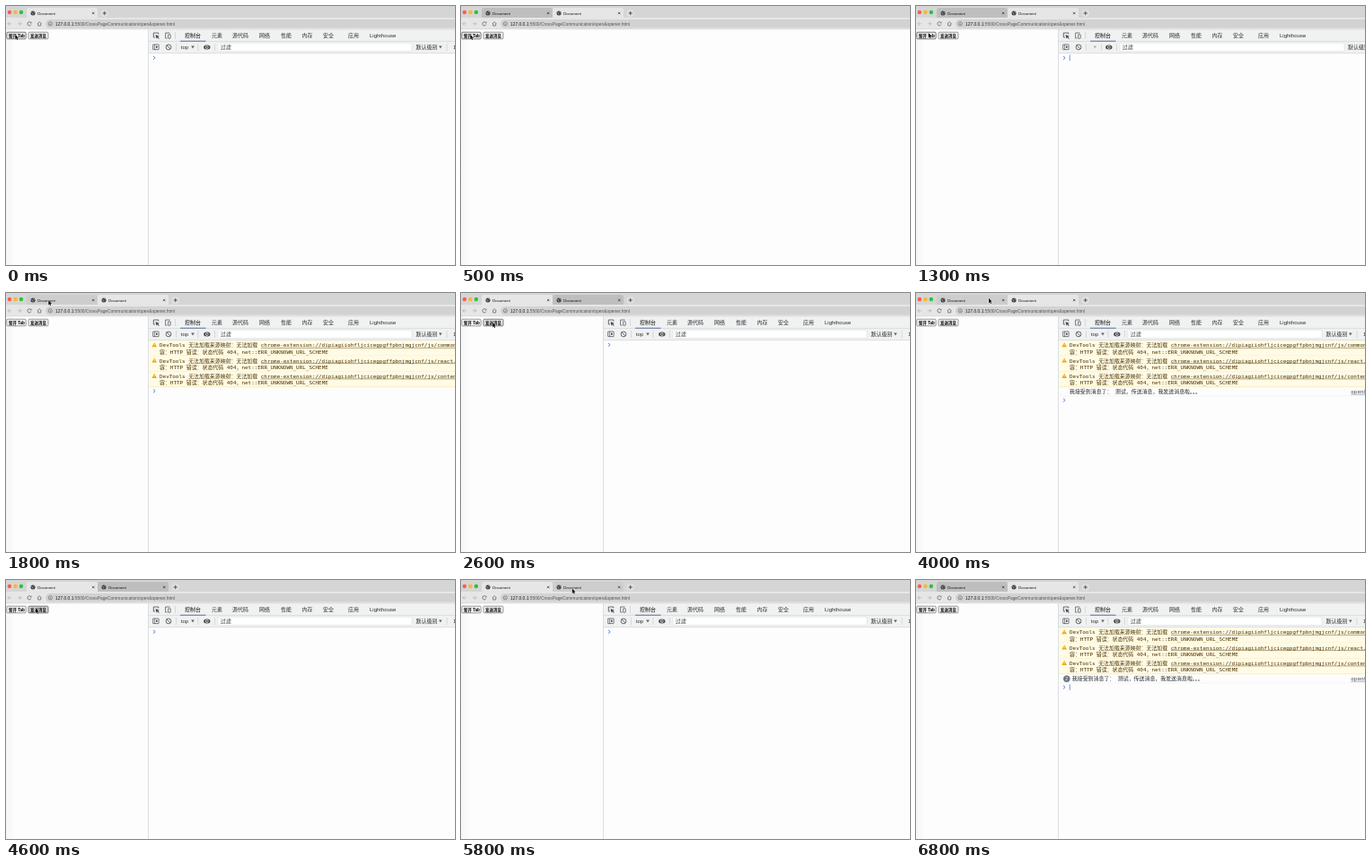
An HTML page with a canvas for the animation above (7 s loop, 500 px wide and 289 px high).

```html
<!DOCTYPE html>
<html lang="zh-CN">
<head>
<meta charset="utf-8">
<title>Document</title>
<style>
html, body { margin: 0; width: 100%; height: 100%; overflow: hidden; background: #fdfdfd; }
canvas { display: block; width: 500px; height: 289px; }
</style>
</head>
<body>
<canvas id="stage"></canvas>
<script>
const W = 500, H = 289, LOOP = 7000, STEP = 100;
const SANS = '"Liberation Sans", "Noto Sans CJK SC", "Noto Sans CJK", sans-serif';
const MONO = '"DejaVu Sans Mono", "Noto Sans CJK SC", "Noto Sans CJK", monospace';
const canvas = document.getElementById('stage');
const ctx = canvas.getContext('2d');
const dpr = window.devicePixelRatio || 1;
canvas.width = W * dpr;
canvas.height = H * dpr;

// Pointer moves: start, end, from point, to point
const moves = [
  [1000, 1300, [10.3, 31.8], [13.8, 30]],
  [1300, 1800, [13.8, 30], [47.3, 8]],
  [1900, 2600, [47.3, 8], [35.2, 32.8]],
  [2700, 3400, [35.2, 32.8], [121, 10]],
  [3500, 4000, [121, 10], [81, 5.8]],
  [4200, 4600, [81, 5.8], [33, 31.5]],
  [5100, 5800, [33, 31.5], [123.8, 9.5]],
  [5900, 6300, [123.8, 9.5], [134, -10]]
];
const extensionFiles = ['common.js', 'react.js', 'content.js'];

const within = (t, a, b) => t >= a && t < b;

function pointerAt(t) {
  let point = moves[0][2];
  for (const [start, end, from, to] of moves) {
    if (t < start) break;
    const p = Math.min(1, (t - start) / (end - start));
    const eased = p * p * (3 - 2 * p);
    point = from.map((v, i) => v + (to[i] - v) * eased);
  }
  return point;
}

function rect(x, y, w, h, fill, radius = 0, stroke) {
  ctx.beginPath();
  ctx.roundRect(x, y, w, h, radius);
  if (fill) { ctx.fillStyle = fill; ctx.fill(); }
  if (stroke) { ctx.strokeStyle = stroke; ctx.lineWidth = 0.7; ctx.stroke(); }
}

function line(points, color, width = 0.8) {
  ctx.beginPath();
  points.forEach(([x, y]) => ctx.lineTo(x, y));
  ctx.strokeStyle = color;
  ctx.lineWidth = width;
  ctx.stroke();
}

function polygon(points, fill) {
  ctx.beginPath();
  points.forEach(([x, y]) => ctx.lineTo(x, y));
  ctx.closePath();
  ctx.fillStyle = fill;
  ctx.fill();
}

function arc(x, y, r, { fill, stroke, width = 0.8, from = 0, to = Math.PI * 2 }) {
  ctx.beginPath();
  ctx.arc(x, y, r, from, to);
  if (fill) { ctx.fillStyle = fill; ctx.fill(); }
  if (stroke) { ctx.strokeStyle = stroke; ctx.lineWidth = width; ctx.stroke(); }
}

// Set large and scaled down so that small sizes keep fractional advances.
function text(str, x, y, size, color, family = SANS, weight = 400) {
  ctx.save();
  ctx.translate(x, y);
  ctx.scale(0.1, 0.1);
  ctx.font = `${weight} ${size * 10}px ${family}`;
  ctx.fillStyle = color;
  ctx.fillText(str, 0, 0);
  const width = ctx.measureText(str).width / 10;
  ctx.restore();
  return width;
}

const downArrow = (x, y, color) =>
  polygon([[x - 1.8, y - 1.5], [x + 1.8, y - 1.5], [x, y + 1.6]], color);
const separator = (x, y) => line([[x, y - 4], [x, y + 4]], '#cbcdd1', 0.7);

function drawTab(x, active, hovered) {
  if (active || hovered) {
    rect(x, 2, 79, 12, active ? '#e7e6e6' : '#cecdcd', [3, 3, 0, 0]);
  } else {
    rect(x, 2, 79, 11, '#bfbebe', [3, 3, 0, 0]);
  }
  arc(x + 7, 8, 2.5, { fill: '#35383b' });
  line([[x + 5.2, 7.2], [x + 6.8, 8], [x + 7, 9.7]], '#c9c9c9', 0.7);
  line([[x + 7.2, 6], [x + 8.8, 7.5]], '#c9c9c9', 0.7);
  text('Document', x + 12.2, 9.8, 4.3, '#0c0c0d');
  const cx = x + 74.2;
  line([[cx - 1.2, 6.8], [cx + 1.2, 9.2]], '#2c2c2f', 0.7);
  line([[cx - 1.2, 9.2], [cx + 1.2, 6.8]], '#2c2c2f', 0.7);
}

function drawBrowser(state) {
  const [px, py] = state.pointer;
  rect(0, 0, W, 14, '#d6d5d5');
  ['#ff5b52', '#f6b82c', '#2ac23d'].forEach((c, i) => arc(3.9 + i * 6.5, 7, 2.2, { fill: c }));
  for (let i = 0; i < state.tabs; i++) {
    const x = 23 + 79 * i;
    drawTab(x, state.active === i, within(px, x, x + 79) && within(py, 2, 13));
  }
  const plus = 30.7 + 79 * state.tabs;
  arc(plus, 8, 4.1, { fill: '#e2e1e1' });
  line([[plus - 2.2, 8], [plus + 2.2, 8]], '#39393b');
  line([[plus, 5.8], [plus, 10.2]], '#39393b');

  rect(0, 13, W, 13, '#e7e6e6');
  rect(44, 15, W, 9.6, '#d3d2d2', 4.8);
  for (const [x, dir] of [[4, 1], [15, -1]]) {
    line([[x - 2.1, 19.8], [x + 2.1, 19.8]], '#b2b1b1', 0.7);
    line([[x, 17.7], [x - 2.1 * dir, 19.8], [x, 21.9]], '#b2b1b1', 0.7);
  }
  arc(26, 19.8, 2.1, { stroke: '#4f4f52', width: 0.7, from: 0.4, to: 5.4 });
  polygon([[26.6, 19.2], [28.4, 19.2], [28.4, 17.4]], '#4f4f52');
  line([[34.9, 20], [37.2, 17.6], [39.5, 20]], '#5a5a5d', 0.7);
  line([[35.7, 19.5], [35.7, 22], [38.7, 22], [38.7, 19.5]], '#5a5a5d', 0.7);
  arc(49.3, 19.8, 2.1, { stroke: '#5a5a5d', width: 0.6 });
  line([[49.3, 19.4], [49.3, 21]], '#5a5a5d', 0.6);
  const host = text('127.0.0.1', 55, 21.6, 4.88, '#1c1c1e');
  text(':5500/CrossPageCommunication/open&opener.html', 55 + host, 21.6, 4.88, '#545354');
  line([[0, 25.8], [W, 25.8]], '#cfcece', 0.5);
}

function drawButton(x, width, label, state, pressed) {
  const [px, py] = state.pointer;
  const hovered = within(px, x, x + width) && within(py, 29, 37);
  const fill = pressed ? '#d6d6d6' : hovered ? '#e8e8e8' : '#f1f1f1';
  rect(x, 29.2, width, 7.6, fill, 1.2, hovered ? '#444' : '#707070');
  text(label, x + 2.1, 34.7, 4.5, '#000', SANS, 700);
}

function drawPage(state) {
  rect(0, 26, W, H - 26, '#fdfdfd');
  const edge = ctx.createLinearGradient(0, 0, 10, 0);
  edge.addColorStop(0, '#f5f5f5');
  edge.addColorStop(1, '#fdfdfd');
  rect(0, 26, 10, H - 26, edge);
  drawButton(0.8, 21.4, '新开 Tab', state, state.pressed === 0);
  drawButton(25, 22, '发送消息', state, state.pressed === 1);
}

function drawEye(x, y) {
  ctx.beginPath();
  ctx.ellipse(x, y, 3.7, 2.5, 0, 0, Math.PI * 2);
  ctx.fillStyle = '#45494e';
  ctx.fill();
  arc(x, y, 1.7, { fill: '#f1f2f3' });
  arc(x, y, 1, { fill: '#45494e' });
}

function drawToolbar(starting) {
  const ink = '#45494e', label = '#2b2e32';
  rect(158, 26, W - 158, 27, '#f0f2f2');
  // Inspect and device icons
  line([[166, 35], [164.3, 35], [164.3, 30], [169.8, 30], [169.8, 31.5]], ink);
  polygon([[166.5, 32], [170.8, 33.7], [169.2, 34.4], [170.8, 36.2], [170, 36.8], [168.4, 35.2], [167.5, 36.6]], ink);
  line([[179.5, 36], [177.6, 36], [177.6, 30], [182.6, 30]], ink, 0.7);
  rect(180.6, 31.8, 2.6, 4.4, null, 0.4, ink);
  separator(188.5, 33);
  const panels = [['控制台', 199], ['元素', 229], ['源代码', 252], ['网络', 282], ['性能', 306],
    ['内存', 329.5], ['安全', 353], ['应用', 381], ['Lighthouse', 405]];
  panels.forEach(([name, x], i) => text(name, x, 35.1, 6, i ? label : '#0c0d0f'));
  line([[158, 39.4], [W, 39.4]], '#cfd1d5', 0.6);
  line([[194, 39.2], [222.5, 39.2]], '#4a6490', 0.9);

  rect(163.7, 43, 6.4, 5.6, null, 0.3, ink);
  line([[165.6, 43], [165.6, 48.6]], ink, 0.6);
  polygon([[167, 44.3], [169.3, 45.8], [167, 47.3]], ink);
  arc(181, 45.9, 2.9, { stroke: ink });
  line([[179, 43.9], [183, 47.9]], ink);
  separator(189.5, 46);

  const shift = starting ? -9 : 0;
  if (starting) {
    downArrow(199.3, 46, '#b0b3b7');
    separator(206.5, 46);
  } else {
    text('top', 194.8, 47.9, 6, label);
    downArrow(208, 46, '#5f646a');
    separator(213.8, 46);
  }
  drawEye(223.8 + shift, 46);
  separator(232.5 + shift, 46);
  const inputEnd = starting ? 477 : 452;
  rect(236 + shift, 41.2, inputEnd - 236 - shift, 9.4, '#fff', 0.5, '#e0e1e3');
  text('过滤', 238.7 + shift, 48.2, 6, '#35383c');
  text('默认级别', starting ? 481 : 456.5, 48.2, 6, label);
  if (!starting) {
    downArrow(483.8, 46, '#5f646a');
    separator(491, 46);
    text('1', 498, 48, 6, label);
  }
  line([[158, 52.6], [W, 52.6]], '#cfd1d5', 0.6);
}

function drawLink(str, x, y, color) {
  text(str, x, y, 5.93, color, MONO);
  line([[x, y + 0.9], [W, y + 0.9]], color, 0.45);
}

function drawWarning(y, file) {
  const ink = '#4e3300';
  rect(159, y, W - 159, 17.3, '#fffbe5');
  line([[159, y + 17.2], [W, y + 17.2]], '#f3e3a8', 0.6);
  polygon([[165.2, y + 2.2], [168, y + 7.3], [162.4, y + 7.3]], '#efaa0a');
  line([[165.2, y + 3.8], [165.2, y + 5.6]], '#fff', 0.6);
  const width = text('DevTools 无法加载来源映射：无法加载 ', 171, y + 7.4, 5.93, ink, MONO);
  drawLink('chrome-extension://dipiagiiohfljcicegpgffpbnjmgjcnf/js/' + file, 171 + width, y + 7.4, ink);
  text('容：HTTP 错误：状态代码 404，net::ERR_UNKNOWN_URL_SCHEME', 171, y + 14.6, 5.93, ink, MONO);
}

function drawMessage(count) {
  if (count > 1) {
    arc(167.8, 110.2, 3.7, { fill: '#6b7480' });
    text('2', 166.3, 112.1, 5.2, '#fff');
  }
  text('我接受到消息了： 测试，传送消息，我发送消息啦。。。', count > 1 ? 173.8 : 171, 112.3, 5.93, '#202225', MONO);
  drawLink('open&opener.html', 484.3, 112.3, '#4a4d52');
  line([[159, 115], [W, 115]], '#ececee', 0.6);
}

function drawDevTools(state) {
  drawToolbar(state.starting);
  let y = 57.8;
  if (state.warnings) {
    extensionFiles.forEach((file, i) => drawWarning(53 + i * 17.3, file));
    y = 109.4;
    if (state.count) {
      drawMessage(state.count);
      y = 119.6;
    }
  }
  line([[164, y - 1.9], [166.1, y], [164, y + 1.9]], '#3b78d8', 0.9);
  if (state.caret) line([[171.2, y - 3.3], [171.2, y + 3.3]], '#5b7fc4', 0.8);
  line([[158.5, 26], [158.5, H]], '#d6d7d9', 0.8);
}

function drawPointer([x, y]) {
  const shape = [[0, 0], [0, 5.4], [1.2, 4.4], [2.1, 6.3], [3, 5.9], [2.1, 4], [3.8, 3.9]]
    .map(([dx, dy]) => [x + dx, y + dy]);
  ctx.lineJoin = 'round';
  line([...shape, shape[0]], '#fff', 0.8);
  polygon(shape, '#111');
}

function stateAt(t) {
  const second = within(t, 400, 1900) || within(t, 3500, 4200) || t >= 5900;
  const firstPress = within(t, 100, 200);
  const sendPress = within(t, 2700, 2800) || within(t, 4600, 4800);
  return {
    pointer: pointerAt(t),
    tabs: t < 400 ? 1 : 2,
    active: second ? 1 : 0,
    pressed: firstPress ? 0 : sendPress ? 1 : -1,
    tools: !within(t, 400, 1100),
    starting: within(t, 1100, 1400),
    warnings: second && t >= 1400,
    count: t >= 6000 ? 2 : t >= 3500 ? 1 : 0,
    caret: within(t, 1100, 1400) || t >= 6800
  };
}

function render(now) {
  const t = Math.floor((now % LOOP) / STEP) * STEP;
  const state = stateAt(t);
  ctx.setTransform(dpr, 0, 0, dpr, 0, 0);
  drawPage(state);
  if (state.tools) drawDevTools(state);
  drawBrowser(state);
  drawPointer(state.pointer);
}

const start = performance.now();
function tick() {
  render(performance.now() - start);
  requestAnimationFrame(tick);
}
tick();
</script>
</body>
</html>
```
